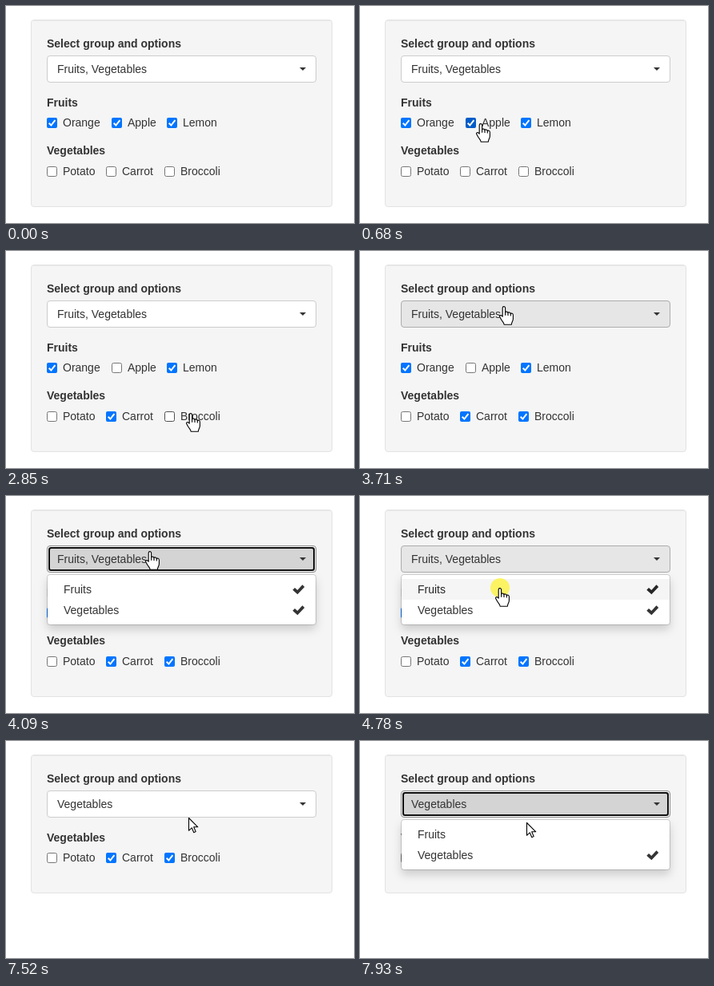
Animation, 435 px wide and 272 px high, one loop 8000 ms. Source, as an HTML page:

```html
<!DOCTYPE html>
<html lang="en">
<head>
<meta charset="utf-8">
<title>Group select</title>
<style>
  html, body { margin: 0; width: 100%; height: 100%; overflow: hidden; background: #fff; }
  svg { display: block; font: 14px "Liberation Sans", Arial, sans-serif; fill: #333; }
  .bold { font-weight: bold; }
  .menu { fill: #fff; filter: drop-shadow(0 6px 6px rgba(0, 0, 0, .175)); }
  .cursor { fill: #fff; stroke: #000; stroke-width: 1.1; stroke-linejoin: round; }
</style>
</head>
<body>
<svg id="stage" width="435" height="272" viewBox="0 0 435 272"></svg>
<script>
const LOOP = 8000;
const stage = document.getElementById('stage');

// Pointer moves: first step, last step, step count, end x, end y
const START = [463, 323];
const MOVES = [
  [130, 530, 6, 151, 148],
  [680, 680, 1, 151, 147],
  [2010, 2230, 4, 152, 210],
  [2700, 2850, 3, 231, 203],
  [3550, 3710, 3, 180, 69],
  [4410, 4550, 3, 175, 115],
  [5330, 5490, 3, 186, 173],
  [7030, 7520, 7, 228, 96],
  [7610, 7690, 2, 208, 77],
  [7930, 7930, 1, 208, 102]
];
const PRESSES = [
  [1220, 1290], [2470, 2550], [3320, 3400], [3950, 4090],
  [4780, 4950], [5720, 5870], [7760, 7850]
];

const between = (v, a, b) => v >= a && v < b;
const easeOut = p => 1 - Math.pow(1 - p, 2.35);

function pointerAt(t) {
  let [x, y] = START;
  for (const [from, to, steps, endX, endY] of MOVES) {
    if (t < from) break;
    const done = t >= to ? steps : 1 + Math.floor((t - from) / (to - from) * (steps - 1));
    const k = easeOut(done / steps);
    x += (endX - x) * k;
    y += (endY - y) * k;
  }
  return { x: Math.round(x), y: Math.round(y) };
}

function stateAt(t) {
  const p = pointerAt(t);
  const open = between(t, 4020, 5870) || t >= 7850;
  const inside = (x, y, w, h) => between(p.x, x, x + w) && between(p.y, y, y + h);
  return {
    p, open, inside,
    visible: t >= MOVES[0][0],
    pressed: PRESSES.some(([a, b]) => between(t, a, b)),
    focused: between(t, 3950, 4780) || t >= 7760,
    fruits: t < 4950,
    apple: t < 1290,
    carrot: t >= 2550,
    broccoli: t >= 3400,
    overButton: inside(51, 62, 337, 34),
    overRow: open && between(p.x, 52, 387) ? Math.floor((p.y - 104) / 26) : -1
  };
}

const text = (s, x, y, attrs = '') => `<text x="${x}" y="${y}" ${attrs}>${s}</text>`;
const box = (x, y, w, h, rx, attrs) =>
  `<rect x="${x}" y="${y}" width="${w}" height="${h}" rx="${rx}" ${attrs}/>`;

function well(height) {
  return box(31.5, 17.5, 376, height, 3.5, 'fill="#f5f5f5" stroke="#e3e3e3"') +
    '<path d="M34 18.5H405" stroke="#000" stroke-opacity=".05"/>';
}

function button(s) {
  const [fill, border] = s.focused ? ['#d4d4d4', '#8c8c8c']
    : s.overButton || s.open ? ['#e6e6e6', '#adadad'] : ['#fff', '#ccc'];
  const ring = s.focused
    ? box(52.5, 63.5, 334, 31, 3, 'fill="none" stroke="#fff"') +
      box(54, 65, 331, 28, 2.5, 'fill="none" stroke="#101010" stroke-width="2"')
    : '';
  return box(51.5, 62.5, 336, 33, 3.5, `fill="${fill}" stroke="${border}"`) + ring +
    text(s.fruits ? 'Fruits, Vegetables' : 'Vegetables', 64, 84) +
    '<path d="M367 77h8l-4 4z"/>';
}

function option(s, label, x, y, width, checked) {
  const hover = !s.open && s.visible && s.inside(x, y - 4, width, 20);
  const mark = checked
    ? box(x, y, 13, 13, 2, `fill="${hover ? '#005cc8' : '#0075ff'}"`) +
      `<path d="M${x + 2.7} ${y + 6.8}l2.7 2.7 5-6.3" fill="none" stroke="#fff" stroke-width="2"/>`
    : box(x + .5, y + .5, 12, 12, 2, `fill="#fff" stroke="${hover ? '#4f4f4f' : '#767676'}"`);
  s.overOption = s.overOption || hover;
  return mark + text(label, Math.round((x + 20) * 10) / 10, y + 11);
}

function groups(s) {
  const top = s.fruits ? 201 : 140;
  let out = '';
  if (s.fruits) {
    out += text('Fruits', 51, 126, 'class="bold"') +
      option(s, 'Orange', 51, 140, 67, true) +
      option(s, 'Apple', 132, 140, 56, s.apple) +
      option(s, 'Lemon', 201, 140, 63, true);
  }
  return out + text('Vegetables', 51, s.fruits ? 186 : 126, 'class="bold"') +
    option(s, 'Potato', 51, top, 61, false) +
    option(s, 'Carrot', 125, top, 60, s.carrot) +
    option(s, 'Broccoli', 198, top, 70, s.broccoli);
}

function menu(s) {
  if (!s.open) return '';
  const rows = [['Fruits', s.fruits], ['Vegetables', true]].map(([label, on], i) => {
    const y = 104 + i * 26, hover = s.overRow === i;
    return `<g fill="${hover ? '#262626' : '#333'}">` +
      (hover ? box(52, y, 335, 26, 0, 'fill="#f5f5f5"') : '') +
      text(label, 72, y + 18) +
      (on ? `<path d="M358.3 ${y + 13.7}l2.7-2.8 3.3 3.2 6.2-6.9 2.7 2.7-8.8 9.4z"/>` : '') + '</g>';
  });
  return box(52, 99, 335, 62, 3, 'class="menu"') +
    box(51.5, 98.5, 336, 63, 3.5, 'fill="none" stroke="#000" stroke-opacity=".15"') + rows.join('');
}

const ARROW = '<path d="M.5.5V16.3L4.2 12.8 6.8 18.7 9.2 17.6 6.7 11.8H11.8Z"/>';
const HAND = '<path d="M-1.8 13.2V2.3C-1.8.1 1.6.1 1.6 2.3V8C2 6.6 4.9 6.8 5 8.6 5.6 7.4 8.2 7.8 8.3 9.6' +
  ' 9 8.7 11.4 9.2 11.4 11.2V16C11.4 19 9.4 20 9.3 23.3H.2C0 20.6-1.9 19.6-3.4 17L-5.2 13.8' +
  'C-6.3 11.8-3.8 10.4-1.8 13.2Z"/><path d="M1.6 8v3.8M5 8.6v3.4M8.3 9.6v3" fill="none"/>';

function pointer(s) {
  if (!s.visible) return '';
  const { x, y } = s.p;
  const link = s.overButton || s.overOption || s.overRow === 0 || s.overRow === 1;
  const glow = s.pressed ? '<circle r="12" fill="#fff200" opacity=".6"/>' : '';
  return `<g transform="translate(${x} ${y})">${glow}<g class="cursor">${link ? HAND : ARROW}</g></g>`;
}

let shown = '';
function draw(t) {
  const s = stateAt(t);
  const picture = well(s.fruits ? 234 : 173) +
    text('Select group and options', 51, 52, 'class="bold"') +
    button(s) + groups(s) + menu(s) + pointer(s);
  if (picture !== shown) stage.innerHTML = shown = picture;
}

const begin = performance.now();
function tick() {
  draw((performance.now() - begin) % LOOP);
  requestAnimationFrame(tick);
}
tick();
</script>
</body>
</html>
```
